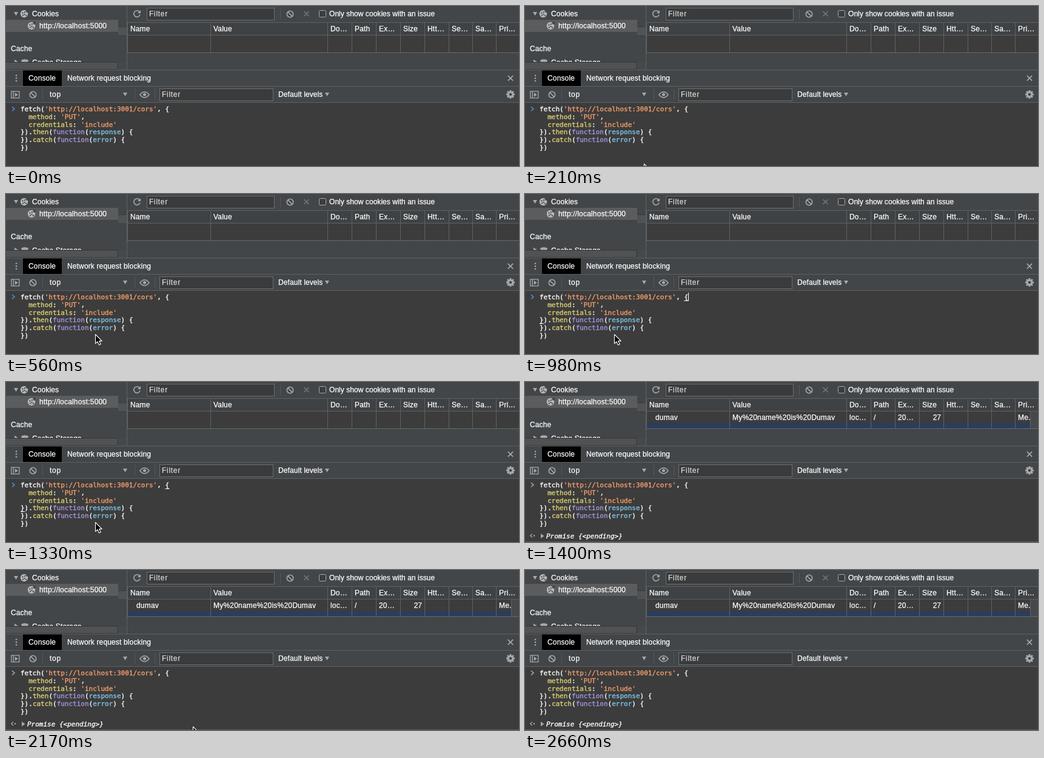
Recreate the animation shown at these times as an HTML page. Size 846 by 266 pixels, loop 2.73 s.

```html
<!DOCTYPE html>
<html lang="en">
<head>
<meta charset="utf-8">
<title>Cookies and console</title>
<style>
  html, body { margin: 0; width: 100%; height: 100%; overflow: hidden; background: #3c3c3c; }
  svg { display: block; width: 846px; height: 266px; }
  text { white-space: pre; fill: #fff; stroke: #fff; }
  .ui { font: 12px "Liberation Sans", Arial, sans-serif; stroke-width: .25; }
  .code { font: 11px "DejaVu Sans Mono", Menlo, monospace; stroke-width: .35; }
  .hint { fill: #d8d8d8; stroke: #d8d8d8; }
  .italic { font-style: italic; }
  .icon { fill: none; stroke: #a6a9ab; stroke-width: 1.6; }
  .thin { stroke-width: 1.3; }
</style>
</head>
<body>
<svg id="stage" viewBox="0 0 846 266"></svg>
<script>
const LOOP = 2730, STEP = 70;
const SENT = 1400;
const CHAR = 6.622;
const BAR = '#424649', PANE = '#3c3c3c', LINE = '#5e6163', SPLIT = '#55585a', GREY = '#a6a9ab';
const COLORS = { s: '#f59f6c', p: '#dfd074', k: '#a596e0', v: '#82c6ea' };
const esc = s => s.replace(/&/g, '&amp;').replace(/</g, '&lt;');

const rect = (x, y, w, h, fill, more = '') =>
  `<rect x="${x}" y="${y}" width="${w}" height="${h}" fill="${fill}" ${more}/>`;
const hline = (x, y, w, c = LINE) => rect(x, y, w, 1, c);
const vline = (x, y, h, c = LINE) => rect(x, y, 1, h, c);
const disc = (x, y, r, fill = GREY) => `<circle cx="${x}" cy="${y}" r="${r}" fill="${fill}"/>`;
const label = (x, y, s, gap = .13, cls = '', more = '') =>
  `<text class="ui ${cls}" x="${x}" y="${y}" letter-spacing="${gap}" ${more}>${esc(s)}</text>`;
const solid = d => `<path d="${d}" fill="${GREY}"/>`;
const icon = (d, cls = '', more = '') => `<path d="${d}" class="icon ${cls}" ${more}/>`;
const down = (x, y, w = 7) => solid(`M${x} ${y}h${w}l${-w / 2} 6z`);
const field = (x, y, w, h) =>
  rect(x + .5, y + .5, w - 1, h - 1, '#3a3b3c', 'stroke="#6c6f71"') +
  label(x + 4, y + 14, 'Filter', .7, 'hint');
const block = (x, y) =>
  `<circle class="icon" cx="${x}" cy="${y}" r="5.2"/>` + icon(`M${x - 3.6} ${y - 3.6}l7.2 7.2`);
const cross = (x, y, r, c) =>
  icon(`M${x - r} ${y - r}l${2 * r} ${2 * r}m0 ${-2 * r}l${-2 * r} ${2 * r}`, '', `style="stroke:${c}"`);

function cookie(x, y) {
  const dots = [[-2.5, -1.5], [1, -2.8], [.5, 1], [-2, 2.6], [3, 2.8]];
  return disc(x, y, 6.2, '#b5b7b8') + disc(x + 5, y - 4.6, 2.3, BAR) +
    dots.map(([a, b]) => disc(x + a, y + b, 1.15, '#45484a')).join('');
}

// Inline colouring: [[s:text]] marks a token by kind.
function code(x, y, src, cls = '') {
  const spans = src.split(/(\[\[\w:.*?\]\])/).map(part => {
    const m = part.match(/^\[\[(\w):(.*)\]\]$/);
    if (!m) return esc(part);
    const c = COLORS[m[1]];
    return `<tspan fill="${c}" stroke="${c}">${esc(m[2])}</tspan>`;
  });
  return `<text class="code ${cls}" x="${x}" y="${y}">${spans.join('')}</text>`;
}

function sidebar() {
  return rect(0, 0, 200, 107, BAR) +
    rect(0, 23, 185, 20, '#5b5c5d') +
    down(13, 10) + cookie(30, 13) + label(43, 17, 'Cookies', .1) +
    cookie(42, 33) + label(55, 37, 'http://localhost:5000', .18) +
    label(8, 75, 'Cache', .1) +
    `<clipPath id="tree"><path d="M0 80h185v13H0z"/></clipPath><g clip-path="url(#tree)">` +
    solid('M14 89v8l6-4z') +
    `<ellipse cx="31" cy="91" rx="6" ry="2.6" fill="${GREY}"/>` + rect(25, 92.5, 12, 5, GREY) +
    label(43, 98, 'Cache Storage') + '</g>' +
    rect(185, 0, 14, 93, '#434648') +
    rect(185, 35, 14, 14, '#505355') + hline(185, 34, 14, '#383a3b') + hline(185, 49, 14, '#383a3b') +
    rect(0, 93, 199, 13, '#46494b') +
    rect(-3, 93.5, 187, 12, '#505254', 'stroke="#343637"') +
    vline(199, 0, 107);
}

const COLUMNS = [337, 530, 570, 610, 650, 690, 730, 769, 808];
const HEADS = ['Value', 'Do…', 'Path', 'Ex…', 'Size', 'Htt…', 'Se…', 'Sa…', 'Pri…'];

function storage() {
  return rect(200, 0, 646, 107, BAR) +
    icon('M220.4 10.2A5.2 5.2 0 1 0 221 14.5') + solid('M222 7v5h-5z') +
    field(232, 3, 211, 21) + vline(452, 5, 17, SPLIT) + block(468.5, 13.5) +
    cross(495.5, 13, 4, '#75787a') +
    rect(516.5, 7.5, 11, 11, '#3b3d3f', 'rx="2" stroke="#a9abac"') +
    label(533, 17, 'Only show cookies with an issue', .05) +
    hline(200, 27, 646) + rect(200, 28, 646, 20, '#3f4244') +
    rect(200, 49, 646, 28, PANE) + hline(200, 48, 646) +
    label(205, 42, 'Name', .1) + HEADS.map((s, i) => label(COLUMNS[i] + 5, 42, s, .2)).join('') +
    `<g id="row">${rect(200, 68, 633, 9, '#2c3d5c')}` +
    label(215, 63, 'dumav', .2) + label(342, 63, 'My%20name%20is%20Dumav', .2) +
    label(535, 63, 'loc…', .15) + label(575, 63, '/') + label(615, 63, '20…', .15) +
    label(686, 63, '27', 0, '', 'text-anchor="end"') + label(813, 63, 'Me.') +
    rect(833, 49, 13, 28, '#46494b') + vline(833, 49, 28) + '</g>' +
    COLUMNS.map(x => vline(x, 28, 49)).join('') + vline(200, 28, 49) +
    hline(200, 77, 646, '#66696b');
}

function drawer() {
  const teeth = Array.from({ length: 8 }, (_, i) =>
    rect(830.5, 140, 3, 4, GREY, `transform="rotate(${i * 45} 832 147)"`));
  return rect(0, 106, 846, 54, BAR) + hline(0, 106, 846) +
    [115.5, 120, 124.5].map(y => disc(17, y, 1.3)).join('') +
    rect(28, 107, 64, 26, '#000') + label(37, 124, 'Console', .15) +
    label(101, 124, 'Network request blocking', .14) + cross(832, 120, 4.2, '#b0b2b3') +
    hline(0, 133, 846) +
    icon('M8.8 141.8h13v11h-13zM12.3 142v11', 'thin') + solid('M14.8 144v7l5-3.5z') +
    block(44.5, 147.5) + vline(60, 138, 18, SPLIT) + label(72, 151, 'top', .7) + down(193, 144) +
    vline(212, 138, 18, SPLIT) +
    icon('M221 147.5q7.5-9.5 15 0q-7.5 9.5-15 0z') + disc(228.5, 147.3, 2.5) +
    vline(245, 138, 18, SPLIT) +
    field(253, 137, 188, 21) + label(449, 151, 'Default levels', .1) + down(526, 144) +
    teeth.join('') + `<circle cx="832" cy="147" r="3.8" fill="none" stroke="${GREY}" stroke-width="3"/>` +
    hline(0, 160, 846);
}

function consoleBody() {
  const lines = [
    "fetch([[s:'http://localhost:3001/cors']], {",
    "  [[p:method]]: [[s:'PUT']],",
    "  [[p:credentials]]: [[s:'include']]",
    '}).[[p:then]]([[k:function]]([[v:response]]) {',
    '}).[[p:catch]]([[k:function]]([[v:error]]) {',
    '})'
  ];
  return rect(0, 161, 846, 105, PANE) +
    icon('M10 167.5l4 3.5l-4 3.5', '', 'id="prompt"') +
    lines.map((s, i) => code(24, 175 + Math.round(i * 12.8), s)).join('') +
    `<g id="match">${rect(24 + 36 * CHAR, 177, 7, 1, '#fff')}${rect(24, 215, 7, 1, '#fff')}</g>` +
    `<g id="caret">${rect(24 + 37 * CHAR, 164, 1, 14, '#fff')}</g>` +
    '<g id="reply">' + icon('M12 252.5l-3.2 3l3.2 3', 'thin') + disc(15, 255.5, 1.3) +
    solid('M26 252v8l5.5-4z') + code(35, 260, 'Promise {<pending>}', 'italic') +
    hline(0, 265, 846, SPLIT) + '</g>';
}

const pointer = '<path id="pointer" d="M.5 .5v15l3.4-3.1l2.6 5.6l2.7-1.2l-2.6-5.4h4.6z" ' +
  'fill="#000" stroke="#fff" stroke-width="1.1" stroke-linejoin="round"/>';

const $ = id => document.getElementById(id);
$('stage').innerHTML = sidebar() + storage() + drawer() + consoleBody() + pointer;

// Pointer stops: time, x, y.
const ENTER = [[210, 196, 262], [280, 170, 247], [350, 152, 236], [420, 147, 233], [SENT, 147, 233]];
const LEAVE = [[1890, 148, 233], [1960, 160, 235], [2030, 199, 243], [2100, 250, 252], [2170, 308, 260], [2240, 370, 268]];

function along(stops, t) {
  const i = stops.findIndex((s, n) => n && t < s[0]);
  if (t < stops[0][0] || i < 0) return null;
  const [t0, x0, y0] = stops[i - 1], [t1, x1, y1] = stops[i];
  const k = (t - t0) / (t1 - t0);
  return [x0 + (x1 - x0) * k, y0 + (y1 - y0) * k];
}

const show = (id, on) => $(id).style.display = on ? '' : 'none';

function draw(ms) {
  const t = Math.floor(ms % LOOP / STEP) * STEP;
  const sent = t >= SENT, pos = along(ENTER, t) || along(LEAVE, t);
  show('row', sent);
  show('reply', sent);
  show('match', t >= 980 && !sent);
  show('caret', t >= 980 && t < 1260);
  show('pointer', pos);
  if (pos) $('pointer').setAttribute('transform', `translate(${pos})`);
  $('prompt').style.stroke = sent ? GREY : '#4a90e2';
}

const start = performance.now();
function tick() {
  draw(performance.now() - start);
  requestAnimationFrame(tick);
}
draw(0);
requestAnimationFrame(tick);
</script>
</body>
</html>
```
